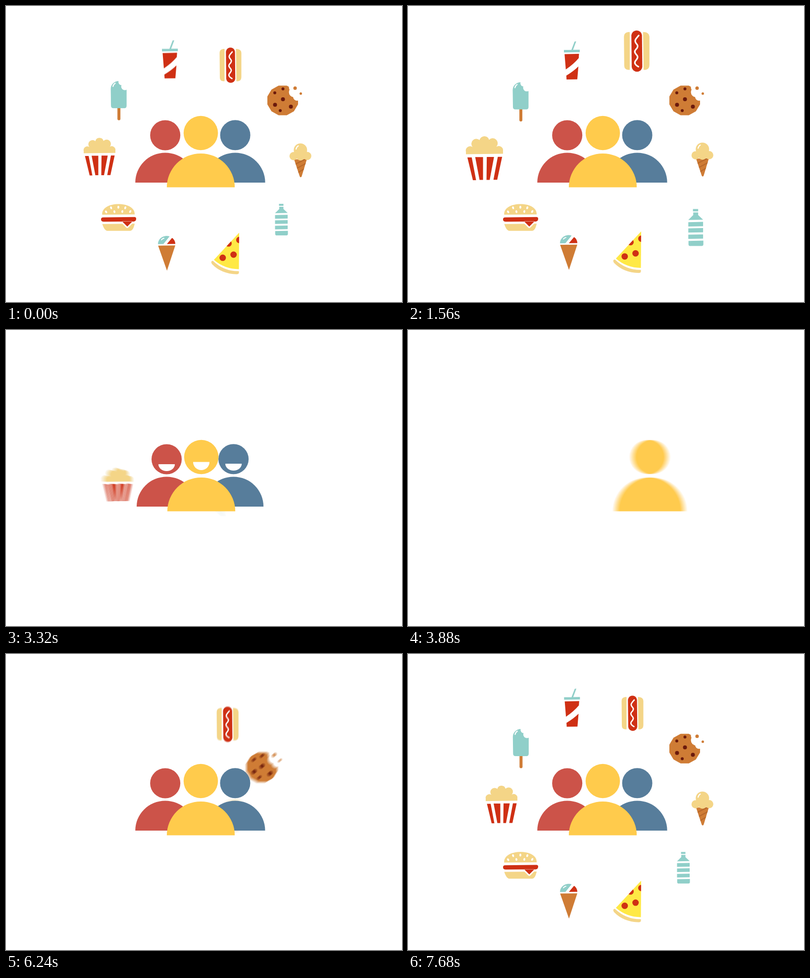
Recreate the animation shown at these times as an HTML page with a canvas. Size 800 by 600 pixels, loop 7.72 s.

```html
<!DOCTYPE html>
<html lang="en">
<head>
<meta charset="utf-8">
<title>Snack choice</title>
<style>
html, body { margin: 0; width: 100%; height: 100%; overflow: hidden; background: #fff; }
canvas { display: block; width: 800px; height: 600px; }
</style>
</head>
<body>
<canvas id="stage" width="800" height="600"></canvas>
<script>
const W = 800, H = 600, LOOP = 7720, STEP = 40, SHUTTER = 20, SAMPLES = 10;
const RED = '#cf3014', TEAL = '#90cfc9', CREAM = '#f4d587', BROWN = '#cf7c35', WHITE = '#fff';

const newContext = () => {
  const canvas = document.createElement('canvas');
  canvas.width = W;
  canvas.height = H;
  return canvas.getContext('2d');
};
const stage = document.getElementById('stage').getContext('2d');
const scene = newContext(), layer = newContext();

// Easing
const clamp = v => Math.min(1, Math.max(0, v));
const mix = (a, b, f) => a + (b - a) * f;
const expoOut = p => p <= 0 ? 0 : p >= 1 ? 1 : 1 - 2 ** (-10 * p);
const expoIn = p => 1 - expoOut(1 - p);
const expoInOut = p => p < .5 ? expoIn(2 * p) / 2 : (1 + expoOut(2 * p - 1)) / 2;

// Drawing helpers
const fill = (c, color, d) => {
  c.fillStyle = color;
  c.fill(new Path2D(d));
};
const line = (c, color, width, d) => {
  c.strokeStyle = color;
  c.lineWidth = width;
  c.lineCap = c.lineJoin = 'round';
  c.stroke(new Path2D(d));
};
const dot = (c, color, x, y, rx, ry = rx, tilt = 0) => {
  c.fillStyle = color;
  c.beginPath();
  c.ellipse(x, y, rx, ry, tilt, 0, 7);
  c.fill();
};
const clipped = (c, d, draw) => {
  c.save();
  c.clip(new Path2D(d));
  draw();
  c.restore();
};

function hotDog(c) {
  fill(c, CREAM, 'M441.5 87V152.5H440Q432 152.5 432 145L431.5 95Q431.5 88 439 87Z' +
    'M464.5 87H466Q475 87.5 475.5 95V144Q475.5 151.5 469 152.5H465.5Z');
  fill(c, RED, 'M444.3 92.5A9.2 9.2 0 0 1 462.6 92.5L463.2 147.5A9.2 9.2 0 0 1 444.9 147.5Z');
  line(c, WHITE, 2.7, 'M457 93C452 99 449.500 101 451.500 105C454 109 457 110 454 115' +
    'C450 119 449 121 452 125C456 129 456 131 453 135C449 139 449 143 456.500 147');
}

function cookie(c) {
  let d = '';
  for (let k = 0; k < 12; k++) {
    const a = (k + .5) * Math.PI / 6;
    d += (k ? 'L' : 'M') + (559 + 30 * Math.cos(a)) + ' ' + (191.4 + 29 * Math.sin(a));
  }
  d += 'Z';
  fill(c, BROWN, d);
  line(c, BROWN, 4, d);
  for (const [x, y, r] of [[580, 165, 8.5], [582, 174.5, 10.5], [588, 184, 8], [592, 177, 9]]) dot(c, WHITE, x, y, r);
  for (const [x, y, r] of [[543, 176, 3], [559.5, 168, 3], [559.5, 189, 4],
    [543.5, 200.3, 4], [575.5, 204, 4], [554, 212, 3]]) dot(c, '#6b1a0c', x, y, r);
  dot(c, BROWN, 584, 166.5, 3.5);
  dot(c, BROWN, 595.5, 177.5, 2.5);
}

function iceCream(c) {
  const cone = 'M582 311L608 310L597.300 345.500Q595.300 349 593.400 345.500Z';
  fill(c, BROWN, cone);
  clipped(c, cone, () => line(c, '#b8692b', 2.2, 'M580 323L610 308M582 332L608 318M586 340L606 328'));
  dot(c, CREAM, 594.8, 292, 13.5);
  dot(c, CREAM, 581, 304.3, 8.3);
  dot(c, CREAM, 608.5, 304, 8.3);
  dot(c, CREAM, 595, 305, 8.3);
  line(c, WHITE, 2.2, 'M586 290Q587 285.500 590.500 283.500');
}

function bottle(c) {
  fill(c, TEAL, 'M551.5 401H560.5V405H551.5ZM552 407H560.5V411.5L569 419.5L543.5 420L552 411.500Z' +
    'M543.500 423.800L569 423.300V430.800L543.500 431.300ZM543.500 434.500L569 434V441.300L543.500 441.800Z' +
    'M543.500 445.500L569 445V452.300L543.500 452.800ZM543.800 456.300L569.500 455.800V462Q569.500 465 566.500 465H547Q544 465.500 543.800 462Z');
}

function pizza(c) {
  const slice = 'M471 459.500L470.500 533.500Q441 533 420 514.500Z';
  fill(c, '#ffe945', slice);
  clipped(c, slice, () => {
    for (const [x, y] of [[437.8, 510.3], [459.7, 504], [449.5, 481.3], [471.5, 474.3]]) dot(c, RED, x, y, 6.5);
  });
  fill(c, CREAM, 'M418 516.500Q440 538 470.500 537.500V541Q470 543.700 466 543.700Q435 543 416 523Q412.500 517 418 516.500Z');
}

function snowCone(c) {
  fill(c, BROWN, 'M307.300 485.700L342 485.300L325.200 536.500Z');
  fill(c, TEAL, 'M307 482.700A17.500 16.500 0 0 1 330.500 467L318 482.500Z');
  fill(c, RED, 'M325 482.400L335.500 470Q341.500 474 342.200 482.200Z');
  line(c, WHITE, 2, 'M314 474Q316 471.500 319 470.800');
}

function burger(c) {
  fill(c, CREAM, 'M194.300 423C193.500 409 209 401.500 227 401.500S260.500 408.500 260 422.500Z' +
    'M194.500 442L260 441.300C258.500 448 256 455.500 251 455.700H204.500C199.500 455 196.500 448 194.500 442Z');
  for (const [x, y] of [[212.3, 409], [227, 407.8], [241, 409], [202.3, 417.3], [219, 416.8], [235, 416.6], [251, 416.6]])
    dot(c, WHITE, x, y, 1.9, 2.9, (227 - x) * -.02);
  const dip = 'M234.500 436.500L245 447L255.500 436.500Z';
  line(c, WHITE, 6, dip);
  fill(c, RED, dip + 'M196.500 428.500L259 427.800Q263 427.500 263 431.500Q262.500 436.500 258.500 436.700L197 437.200Q192 437 192 432.500Q192 428.500 196.500 428.500Z');
}

function popcorn(c) {
  fill(c, CREAM, 'M157 298.500V294A7.500 7.500 0 0 1 168.500 286A8.500 8.500 0 0 1 180.500 274' +
    'A8.500 8.500 0 0 1 197 273.500A8.500 8.500 0 0 1 209.500 285.500A7.500 7.500 0 0 1 221 293V297.700Z');
  fill(c, RED, 'M159.500 304H167L174.500 343.500H169ZM173 303.500H186.500V343H180.500Z' +
    'M193 303.200H205.500L198 343H192.500ZM212 303H219.500L211 342.800H204.500Z');
}

function popsicle(c) {
  fill(c, BROWN, 'M225 206H231V228.500A3 3 0 0 1 225 228.500Z');
  fill(c, TEAL, 'M211.500 168A16 16 0 0 1 243.500 168V202Q243.500 207 239 207H217Q212 207 212 202Z');
  dot(c, WHITE, 233.5, 154, 6.5);
  dot(c, WHITE, 240, 163, 7.5);
  line(c, WHITE, 2.2, 'M216 163Q217 158.500 220.500 156.500');
}

function drink(c) {
  c.lineCap = 'butt';
  fill(c, TEAL, 'M330 86.500L336.500 69.500L339.800 69L333.300 86.500ZM315 86.500L347 86V91L315 91.500Z');
  fill(c, RED, 'M316.300 95L345.500 94.300L344.900 103Q335 115 318.800 126Z' +
    'M344.200 120L342 146L320.300 146.300L319.800 138.500Q334 130 344.200 120Z');
}

// Clockwise order: icon, centre, fade-out start or enlarged place and turn.
const foods = [
  { draw: hotDog, x: 453.5, y: 120, pick: [462, 89.5], turn: 0 },
  { draw: cookie, x: 559, y: 191, fade: 1560 },
  { draw: iceCream, x: 595, y: 313, fade: 1640 },
  { draw: bottle, x: 556.5, y: 433, pick: [581.5, 452], turn: 1 },
  { draw: pizza, x: 443, y: 501.5, fade: 1760 },
  { draw: snowCone, x: 324.5, y: 501, fade: 1600 },
  { draw: burger, x: 227.5, y: 429, fade: 1680 },
  { draw: popcorn, x: 189, y: 304, pick: [154.5, 305], turn: 2 },
  { draw: popsicle, x: 227.5, y: 192, fade: 1760 },
  { draw: drink, x: 331, y: 108, fade: 1640 }
];
const HUB = { x: 393, y: 335 }, GLIDE = 860, FADE = 120, STAGGER = 120;

function bob(i, t) {
  const phase = (252 - 36 * i) * Math.PI / 180;
  return 1.7 * (Math.sin(t * Math.PI / 600 + phase) - Math.sin(phase));
}

function foodPose(food, i, t) {
  if (t > 5000) {
    const age = t - 5950 - i * STAGGER, f = expoOut(age / GLIDE);
    return {
      x: mix(HUB.x, food.x, f), y: mix(HUB.y, food.y, f) + bob(i, t - LOOP) * f,
      scale: 1, alpha: clamp(age / FADE)
    };
  }
  if (!food.pick) {
    return { x: food.x, y: food.y + bob(i, t), scale: 1, alpha: clamp(1 - (t - food.fade) / 320) };
  }
  const grow = expoInOut((t - 760 - food.turn * STAGGER) / 400);
  const left = 3220 + food.turn * 125 - t, out = expoIn(1 - left / GLIDE);
  const size = mix(1, 1.17, grow);
  return {
    x: mix(mix(food.x, food.pick[0], grow), HUB.x, out),
    y: mix(mix(food.y, food.pick[1], grow) + bob(i, t) * size, HUB.y, out),
    scale: mix(size, .21, out), alpha: clamp(left / FADE)
  };
}

// Runs a drawing as one group with a common opacity.
function group(alpha, draw) {
  if (alpha <= 0) return;
  if (alpha >= 1) return draw(scene);
  layer.clearRect(0, 0, W, H);
  draw(layer);
  scene.globalAlpha = alpha;
  scene.drawImage(layer.canvas, 0, 0);
  scene.globalAlpha = 1;
}

function drawFood(food, i, t) {
  const p = foodPose(food, i, t);
  group(p.alpha, c => {
    c.save();
    c.translate(p.x, p.y);
    c.scale(p.scale, p.scale);
    c.translate(-food.x, -food.y);
    food.draw(c);
    c.restore();
  });
}

const people = [
  { color: '#cc5349', x: 321.7, head: [262, 30.5], body: [358, 60.5], mouth: [272, 14], turn: 2, tuck: 71.8, leave: 3780, enter: 5330 },
  { color: '#577d9b', x: 463.1, head: [261.7, 30.5], body: [358, 60.5], mouth: [271, 14], turn: 1, tuck: -69.6, leave: 3660, enter: 5450 },
  { color: '#ffcb4c', x: 393.5, head: [257.5, 34.7], body: [367.5, 68.6], mouth: [267.5, 16.5], turn: 0, tuck: 0, leave: 4000, enter: 5080 }
];

function drawPerson(p, t) {
  if (t >= p.leave && t <= p.enter) return;
  const late = t > 4500;
  const slide = late ? -156 * (1 - expoOut((t - 5080) / GLIDE)) : 250 * expoIn(1 - (4000 - t) / GLIDE);
  const tuck = p.tuck * (late ? 1 - expoOut((t - p.enter) / GLIDE) : expoIn(1 - (p.leave - t) / GLIDE));
  const x = p.x + slide + tuck;
  const alpha = p.tuck ? 1 : clamp((late ? t - p.enter : p.leave - t) / FADE);
  const open = expoOut((t - 1782 - p.turn * 121) / 500) * (1 - expoOut((t - 3500) / 300));
  group(alpha, c => {
    dot(c, p.color, x, p.head[0], p.head[1]);
    c.beginPath();
    c.arc(x, p.body[0], p.body[1], Math.PI, 0);
    c.fill();
    if (open <= 0) return;
    const [top, depth] = p.mouth, y = top + depth * .47 * (1 - open);
    c.fillStyle = WHITE;
    c.beginPath();
    c.ellipse(x, y, 16.6, depth * open, 0, 0, Math.PI);
    c.fill();
  });
}

function drawScene(t) {
  scene.fillStyle = WHITE;
  scene.fillRect(0, 0, W, H);
  foods.forEach((food, i) => drawFood(food, i, t));
  people.forEach(p => drawPerson(p, t));
}

// Averages several moments of the shutter for motion blur.
function render(t) {
  for (let k = 0; k < SAMPLES; k++) {
    const shift = ((k + .5) / SAMPLES - .5) * SHUTTER;
    drawScene((t + shift + LOOP) % LOOP);
    stage.globalAlpha = 1 / (k + 1);
    stage.drawImage(scene.canvas, 0, 0);
  }
}

const start = performance.now();
let shown = -1;
function tick() {
  const t = Math.floor((performance.now() - start) % LOOP / STEP) * STEP;
  if (t !== shown) render(shown = t);
  requestAnimationFrame(tick);
}
tick();
</script>
</body>
</html>
```
